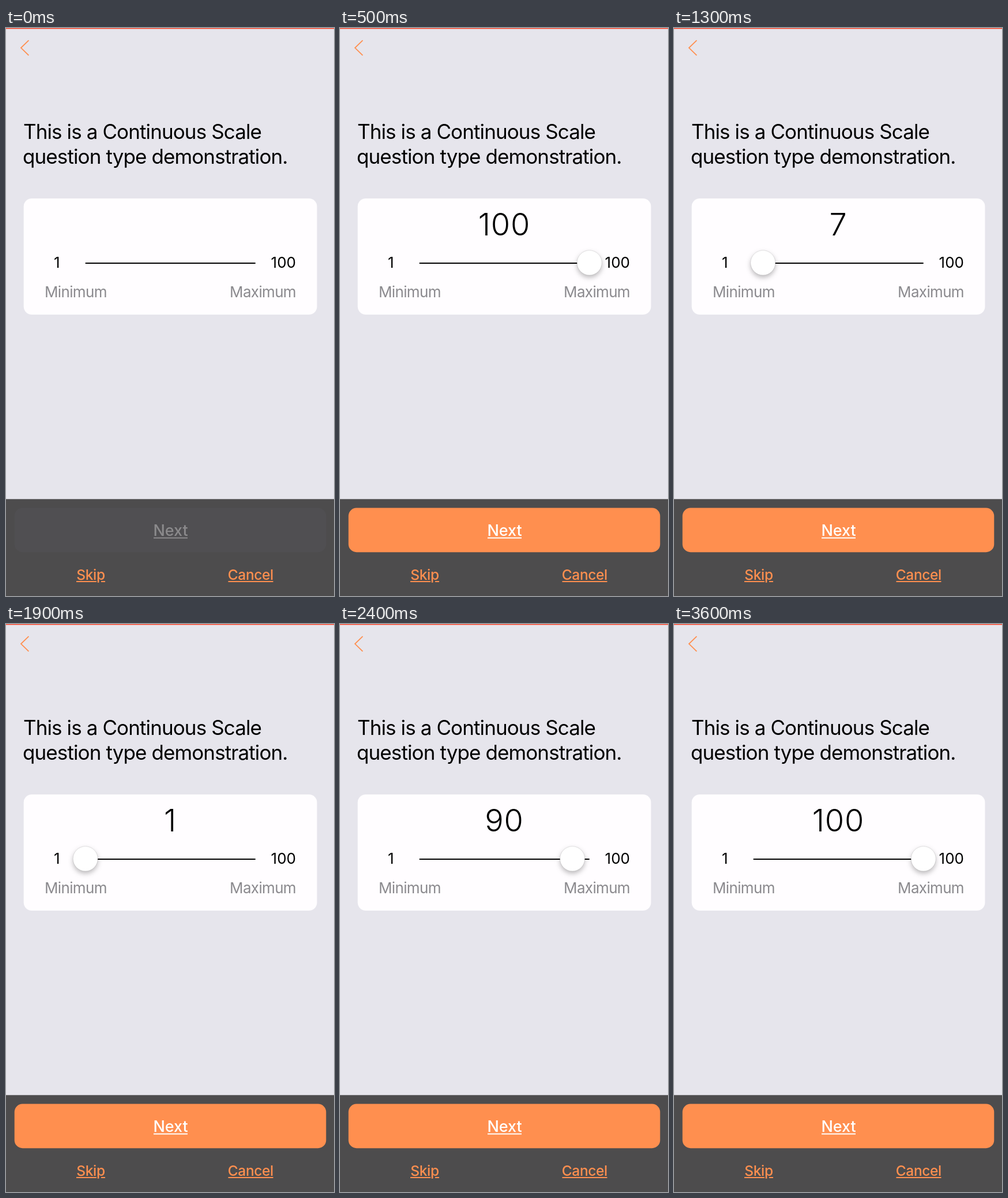
An HTML page that plays this animation: 569x983 px, repeating every 3700 ms.

```html
<!DOCTYPE html>
<html lang="en">
<head>
<meta charset="utf-8">
<title>Continuous scale</title>
<style>
  html, body { margin: 0; width: 100%; height: 100%; overflow: hidden; background: #e6e5ec; }
  svg { display: block; width: 100vw; height: 100vh; }
  text { font-family: Inter, Roboto, sans-serif; font-optical-sizing: none; }
  .title { font-size: 35px; letter-spacing: -.0255em; }
  .label { font-size: 26px; }
  .muted { fill: #8b8a8e; letter-spacing: -.025em; }
  .value { font-size: 54px; font-weight: 300; letter-spacing: .015em; text-anchor: middle; }
  .end { text-anchor: end; }
  .link { font-size: 24.5px; font-weight: 550; letter-spacing: -.015em; fill: #ff8f4f; text-anchor: middle; }
  .next { font-size: 27px; font-weight: 550; letter-spacing: -.005em; text-anchor: middle; }
  .thumb { fill: #fff; stroke: #0002; stroke-width: .8; filter: drop-shadow(0 4px 4.5px #0004); }
  .rule { stroke-width: 2; }
  #next { fill: #504f52; color: #8b8a8c; }
  #next.on { fill: #ff8f4f; color: #fff; }
  #next text { fill: currentColor; }
  #next path { stroke: currentColor; }
</style>
</head>
<body>
<svg viewBox="0 0 569 983">
  <rect width="569" height="983" fill="#e6e5ec"/>
  <rect width="569" height="1.5" fill="#f8492f"/>
  <path d="M39.4 21.3 26 34.3 39.4 47.3" fill="none" stroke="#ff8f4f" stroke-width="1.8"/>

  <text class="title" x="30" y="191.5">This is a Continuous Scale</text>
  <text class="title" x="29" y="235">question type demonstration.</text>

  <rect x="30.7" y="295" width="508.8" height="201" rx="14" fill="#fffdff"/>
  <text class="label" x="83" y="415">1</text>
  <text class="label end" x="503" y="415">100</text>
  <text class="label muted" x="67" y="466">Minimum</text>
  <text class="label muted end" x="503" y="466">Maximum</text>
  <path class="rule" d="M137.7 406.9H432.7" stroke="#000"/>
  <g id="answer">
    <text id="value" class="value" x="285" y="359"></text>
    <circle id="thumb" class="thumb" cy="406.3" r="21.5"/>
  </g>

  <rect y="815.3" width="569" height="167.7" fill="#4d4c4d"/>
  <g id="next">
    <rect x="14.7" y="830.6" width="540.6" height="76.6" rx="14"/>
    <text class="next" x="285.5" y="878.5">Next</text>
    <path class="rule" d="M256 882.5H315"/>
  </g>
  <text class="link" x="147" y="954.5">Skip</text>
  <path class="rule" d="M122 958H157M165 958H172" stroke="#ff8f4f"/>
  <text class="link" x="424.3" y="954.5">Cancel</text>
  <path class="rule" d="M385.5 958H463.5" stroke="#ff8f4f"/>
</svg>
<script>
  const LOOP = 3700, STEP = 100, MIN = 1, MAX = 100;
  const $ = id => document.getElementById(id);
  const answer = $('answer'), value = $('value'), thumb = $('thumb'), next = $('next');

  // Each drag: start ms, end ms, from value, to value
  const drags = [
    [100, 430, 50, MAX],
    [600, 1418, MAX, MIN],
    [1900, 2522, MIN, MAX]
  ];

  function valueAt(t) {
    const [start, end, from, to] = drags.filter(d => t >= d[0]).pop() || drags[0];
    const p = Math.min(1, Math.max(0, (t - start) / (end - start)));
    return from + (to - from) * p * p * (3 - 2 * p);
  }

  function draw(now) {
    const t = Math.floor(now % LOOP / STEP) * STEP;
    const touched = t >= drags[0][0];
    const v = valueAt(t);
    answer.style.display = touched ? '' : 'none';
    next.classList.toggle('on', touched);
    value.textContent = Math.round(v);
    thumb.setAttribute('cx', 137.7 + 295 * (v - MIN) / (MAX - MIN));
  }

  const origin = performance.now();
  function tick() {
    draw(performance.now() - origin);
    requestAnimationFrame(tick);
  }
  tick();
</script>
</body>
</html>
```
